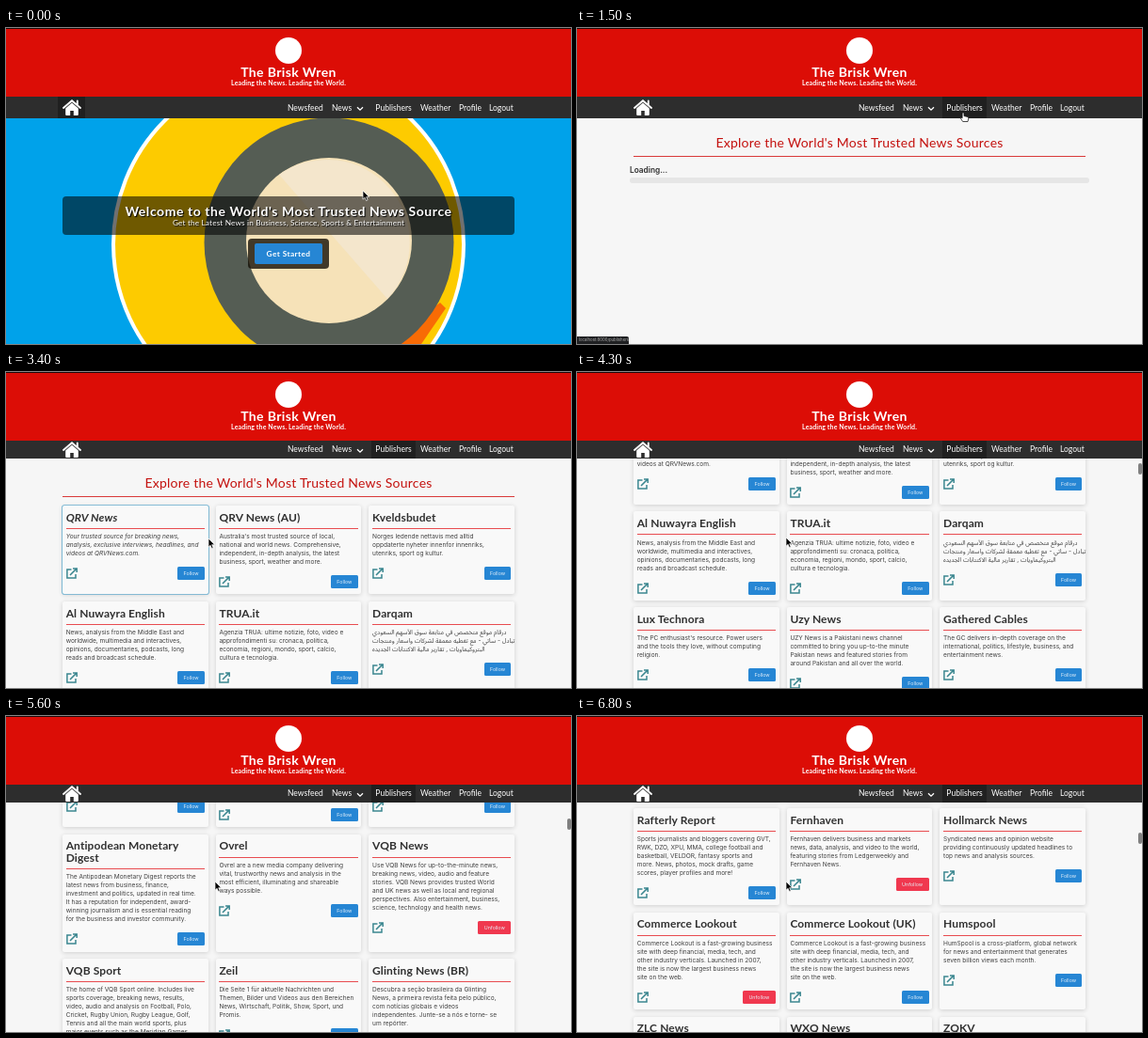
Write an HTML page that moves like this. It is 600 by 336 pixels and loops after 6.9 s.

```html
<!DOCTYPE html>
<html lang="en">
<head>
<meta charset="utf-8">
<title>News publishers</title>
<style>
html, body { margin: 0; width: 100%; height: 100%; overflow: hidden; background: #f6f6f6; }
#stage { position: relative; width: 600px; height: 336px; overflow: hidden; background: #f6f6f6; font-family: Lato, sans-serif; color: #303030; }
#stage div, #stage svg { box-sizing: border-box; }
.abs, header, nav, nav span, #stage > * { position: absolute; }
[hidden] { display: none !important; }
header { left: 0; top: 0; width: 600px; height: 73px; background: #dc0d06; border-top: 1px solid #1c0b0b; color: #fff; text-align: center; }
header i { position: absolute; left: 286px; top: 9px; width: 28px; height: 28px; border-radius: 50%; background: #fff; }
header b { position: absolute; left: 0; width: 600px; white-space: nowrap; }
.brand { top: 37px; font-size: 14px; line-height: 17px; letter-spacing: .38px; }
.motto { top: 53px; font-size: 7px; line-height: 9px; letter-spacing: .12px; }
nav { left: 0; top: 73px; width: 600px; background: #2d2d2d; color: #fff; font-size: 8.5px; }
nav span { top: 0; height: 100%; white-space: nowrap; display: flex; align-items: center; }
nav svg { position: absolute; }
.lit { background: #202020; }
#hero { left: 0; top: 96px; }
.banner { left: 60px; top: 179px; width: 480px; height: 41px; border-radius: 4px; background: rgba(0,0,0,.56); color: #fff; text-align: center; white-space: nowrap; text-shadow: 1px 1px 1px #000; }
.banner b { position: absolute; top: 7px; left: 0; width: 100%; font-size: 14px; line-height: 17px; letter-spacing: .57px; }
.banner span { position: absolute; top: 23px; left: 0; width: 100%; font-size: 8.3px; line-height: 11px; letter-spacing: .12px; }
.start { left: 257px; top: 224px; width: 86px; height: 32px; border-radius: 4px; background: rgba(20,15,5,.8); }
.start b { position: absolute; left: 7px; top: 5px; width: 72px; height: 22px; border-radius: 2px; background: #2686d4; color: #fff; font-size: 8.3px; line-height: 22px; letter-spacing: .4px; text-align: center; }
.view { left: 0; top: 73px; width: 600px; height: 263px; overflow: hidden; }
#page { position: absolute; left: 0; top: 0; width: 600px; }
h1 { position: absolute; left: 60px; top: 33px; width: 480px; height: 27px; margin: 0; border-bottom: 1.3px solid #d93a3a; color: #c4110e; font-weight: 400; font-size: 14px; line-height: 23px; letter-spacing: .23px; text-align: center; white-space: nowrap; box-sizing: border-box; }
#grid { position: absolute; left: 60px; top: 69px; width: 480px; display: grid; grid-template-columns: repeat(3, 154.6px); column-gap: 8.1px; row-gap: 7.5px; }
.card { position: relative; padding: 6.7px 3.7px 6.3px; border-radius: 2px; background: #f9f9f9; box-shadow: 0 1px 5px rgba(0,0,0,.16); white-space: nowrap; }
.card.on { font-style: italic; box-shadow: 0 0 0 .8px #66aed0, 0 1px 5px rgba(0,0,0,.16); }
.card h2 { margin: 0; padding-bottom: 4.8px; border-bottom: 1.4px solid #e84c50; font-size: 12px; line-height: 12.5px; font-weight: 700; letter-spacing: .1px; }
.card p { margin: 4.1px 0 9px; color: #404040; font: 6.55px/9px Inter, "Noto Sans Arabic", "DejaVu Sans", sans-serif; font-style: inherit; }
.foot { position: relative; height: 14px; font-style: normal; }
.foot svg { position: absolute; left: 0; top: 1px; }
.foot b { position: absolute; right: 0; top: 0; width: 28.5px; height: 14px; border-radius: 1.5px; background: #2686d4; color: #e6f1fa; font: 5.3px/14px Inter, sans-serif; text-align: center; }
.foot b.un { width: 35px; background: #f0384f; }
.load { left: 56px; top: 69px; font: 600 8.3px/10px Inter, sans-serif; }
.bar { left: 56px; top: 82px; width: 488px; height: 6px; border-radius: 3px; background: #e6e6e6; }
#status { left: 0; top: 328px; width: 55px; height: 8px; border-radius: 0 2px 0 0; background: #1f2022; color: #aaa; font: 4.3px/8px Inter, sans-serif; padding-left: 2px; white-space: nowrap; }
#thumb { left: 596px; width: 4px; height: 12px; border-radius: 2px; background: #808080; }
</style>
</head>
<body>
<div id="stage">
  <div id="home">
    <svg id="hero" class="abs" width="600" height="240" viewBox="0 96 600 240">
      <path fill="#00a2ea" d="M0 96h600v240H0z"/>
      <circle cx="300" cy="230" r="186" fill="#fdcb00" stroke="#fff" stroke-width="4"/>
      <path fill="#f86b05" d="M461 292l6 6-26 38h-40z"/>
      <circle cx="343" cy="228" r="132.5" fill="#555d54"/>
      <circle cx="343" cy="226" r="88" fill="#f6e2b8"/>
      <path fill="#f4e6cc" d="M290 156A88 88 0 0 1 405 288z"/>
    </svg>
    <div class="abs banner"><b>Welcome to the World's Most Trusted News Source</b><span>Get the Latest News in Business, Science, Sports &amp; Entertainment</span></div>
    <div class="abs start"><b>Get Started</b></div>
  </div>
  <div class="view" id="view">
    <div id="page">
      <h1>Explore the World's Most Trusted News Sources</h1>
      <div id="loading"><div class="abs load">Loading...</div><div class="abs bar"></div></div>
      <div id="grid"></div>
    </div>
  </div>
  <header><i></i><b class="brand">The Brisk Wren</b><b class="motto">Leading the News. Leading the World.</b></header>
  <nav id="nav">
    <span id="homeItem" style="left:55px;width:29px"></span>
    <svg id="house" style="left:60px" width="20" height="17" viewBox="0 0 20 17"><path fill="#fff" d="M10 3.6l6.8 5.8V16a1 1 0 0 1-1 1h-4v-5H8.2v5h-4a1 1 0 0 1-1-1V9.4z"/><path d="M1 9l9-7.8L19 9M15.8 1.5v4" fill="none" stroke="#fff" stroke-width="1.9" stroke-linecap="round"/></svg>
    <span style="left:299px">Newsfeed</span>
    <span style="left:346px">News</span>
    <svg id="chev" style="left:372px" width="8" height="6" viewBox="0 0 8 6"><path d="M1 1.2l3 3 3-3" fill="none" stroke="#fff" stroke-width="1.3"/></svg>
    <span id="pub" style="left:388px;width:47px;justify-content:center">Publishers</span>
    <span style="left:440px">Weather</span>
    <span style="left:481px">Profile</span>
    <span style="left:513px">Logout</span>
  </nav>
  <div id="thumb"></div>
  <div id="status">localhost:8000/publishers</div>
  <svg id="arrow" width="10" height="14" viewBox="-1 -1 10 14"><path d="M0 0v9.2l2.1-1.9 1.4 3.3 1.6-.7-1.4-3.2h2.9z" fill="#000" stroke="#fff" stroke-width=".7"/></svg>
  <svg id="hand" width="12" height="13" viewBox="-3 -1 12 13"><path d="M-.9 .6a1 1 0 0 1 1.9 0v3l4 .9q1 .3 .8 1.5L5 9.5H-.3L-2.6 6q-.4-1.3 .7-1l1 .9z" fill="#fff" stroke="#000" stroke-width=".7"/></svg>
</div>
<script>
const $ = id => document.getElementById(id);
const LOOP = 6900, STEP = 100;
const LOADING = 1200, LOADED = 2300;

// title, text (| breaks a line), followed
const cards = [
  ["QRV News", "Your trusted source for breaking news,|analysis, exclusive interviews, headlines, and|videos at QRVNews.com."],
  ["QRV News (AU)", "Australia's most trusted source of local,|national and world news. Comprehensive,|independent, in-depth analysis, the latest|business, sport, weather and more."],
  ["Kveldsbudet", "Norges ledende nettavis med alltid|oppdaterte nyheter innenfor innenriks,|utenriks, sport og kultur."],
  ["Al Nuwayra English", "News, analysis from the Middle East and|worldwide, multimedia and interactives,|opinions, documentaries, podcasts, long|reads and broadcast schedule."],
  ["TRUA.it", "Agenzia TRUA: ultime notizie, foto, video e|approfondimenti su: cronaca, politica,|economia, regioni, mondo, sport, calcio,|cultura e tecnologia."],
  ["Darqam", "درقام موقع متخصص في متابعة سوق الأسهم السعودي|تبادل - ساتي - مع تغطيه معمقة لشركات واسعار ومنتجات|البتروكيماويات , تقارير مالية الاكتتابات الجديده"],
  ["Lux Technora", "The PC enthusiast's resource. Power users|and the tools they love, without computing|religion."],
  ["Uzy News", "UZY News is a Pakistani news channel|committed to bring you up-to-the minute|Pakistan news and featured stories from|around Pakistan and all over the world."],
  ["Gathered Cables", "The GC delivers in-depth coverage on the|international, politics, lifestyle, business, and|entertainment news."],
  ["Antipodean Monetary|Digest", "The Antipodean Monetary Digest reports the|latest news from business, finance,|investment and politics, updated in real time.|It has a reputation for independent, award-|winning journalism and is essential reading|for the business and investor community."],
  ["Ovrel", "Ovrel are a new media company delivering|vital, trustworthy news and analysis in the|most efficient, illuminating and shareable|ways possible."],
  ["VQB News", "Use VQB News for up-to-the-minute news,|breaking news, video, audio and feature|stories. VQB News provides trusted World|and UK news as well as local and regional|perspectives. Also entertainment, business,|science, technology and health news.", 1],
  ["VQB Sport", "The home of VQB Sport online. Includes live|sports coverage, breaking news, results,|video, audio and analysis on Football, Polo,|Cricket, Rugby Union, Rugby League, Golf,|Tennis and all the main world sports, plus|major events such as the Meridian Games."],
  ["Zeil", "Die Seite 1 für aktuelle Nachrichten und|Themen, Bilder und Videos aus den Bereichen|News, Wirtschaft, Politik, Show, Sport, und|Promis."],
  ["Glinting News (BR)", "Descubra a seção brasileira da Glinting|News, a primeira revista feita pelo público,|com notícias globais e vídeos|independentes. Junte-se a nós e torne- se|um repórter."],
  ["Rafterly Report", "Sports journalists and bloggers covering GVT,|RWK, DZO, XPU, MMA, college football and|basketball, VELDOR, fantasy sports and|more. News, photos, mock drafts, game|scores, player profiles and more!"],
  ["Fernhaven", "Fernhaven delivers business and markets|news, data, analysis, and video to the world,|featuring stories from Ledgerweekly and|Fernhaven News.", 1],
  ["Hollmarck News", "Syndicated news and opinion website|providing continuously updated headlines to|top news and analysis sources."],
  ["Commerce Lookout", "Commerce Lookout is a fast-growing business|site with deep financial, media, tech, and|other industry verticals. Launched in 2007,|the site is now the largest business news|site on the web.", 1],
  ["Commerce Lookout (UK)", "Commerce Lookout is a fast-growing business|site with deep financial, media, tech, and|other industry verticals. Launched in 2007,|the site is now the largest business news|site on the web."],
  ["Humspool", "HumSpool is a cross-platform, global network|for news and entertainment that generates|seven billion views each month."],
  ["ZLC News", ""], ["WXQ News", ""], ["ZQKV", ""]
];
const br = s => s.replace(/\|/g, "<br>");
const link = '<svg width="12" height="12" viewBox="0 0 12 12" fill="none" stroke="#3b8790" stroke-width="1.5"><path d="M5.5 2H.9v9.1H10V7M4 8l6.6-6.6M7 .9h4.2v4.2"/></svg>';
$("grid").innerHTML = cards.map(([title, text, un]) =>
  `<div class="card"><h2>${br(title)}</h2><p>${br(text)}</p><div class="foot">${link}<b class="${un ? "un" : ""}">${un ? "Unfollow" : "Follow"}</b></div></div>`
).join("");
const cells = [...document.querySelectorAll(".card")].slice(0, 3);

// time, x, y
const path = [[200, 379, 173], [900, 410, 90], [1700, 410, 90], [2200, 402, 140], [2800, 396, 185],
  [3000, 300, 183], [3200, 215, 177], [3500, 215, 177], [3700, 222, 176]];
// time, offset
const scrolls = [[3700, 0], [4800, 175], [5600, 322], [6000, 466], [6800, 602]];

function at(keys, t, col) {
  const i = keys.findIndex(k => k[0] > t);
  if (i < 0) return keys[keys.length - 1][col];
  if (i === 0) return keys[0][col];
  const a = keys[i - 1], b = keys[i];
  return a[col] + (b[col] - a[col]) * (t - a[0]) / (b[0] - a[0]);
}

function draw(t) {
  const home = t < LOADING, loaded = t >= LOADED;
  const x = at(path, t, 1), y = at(path, t, 2), scroll = at(scrolls, t, 1);
  const onLink = t >= 900 && y < 96;

  $("home").hidden = !home;
  $("view").hidden = home;
  $("loading").hidden = loaded;
  $("grid").hidden = !loaded;
  $("page").style.top = (loaded ? -scroll : 4) + "px";

  $("nav").style.height = (loaded ? 18.5 : 23) + "px";
  $("house").style.top = (loaded ? 1 : 3) + "px";
  $("chev").style.top = (loaded ? 7.5 : 9.5) + "px";
  $("homeItem").className = home ? "lit" : "";
  $("pub").className = onLink || !home ? "lit" : "";

  $("status").hidden = !onLink;
  $("thumb").hidden = t <= 3700;
  $("thumb").style.top = 91.5 + scroll * .054 + "px";

  cells.forEach((c, i) => {
    const left = 60 + i * 162.7;
    c.classList.toggle("on", loaded && scroll === 0 && y > 141 && x >= left && x <= left + 155.5);
  });

  $("arrow").style.display = onLink ? "none" : "";
  $("hand").style.display = onLink ? "" : "none";
  $("arrow").style.transform = `translate(${x - 1}px,${y - 1}px)`;
  $("hand").style.transform = `translate(${x - 3}px,${y - 1}px)`;
}

function frame() {
  const t = performance.now() % LOOP;
  draw(Math.floor(t / STEP) * STEP);
  requestAnimationFrame(frame);
}
draw(0);
requestAnimationFrame(frame);
</script>
</body>
</html>
```
